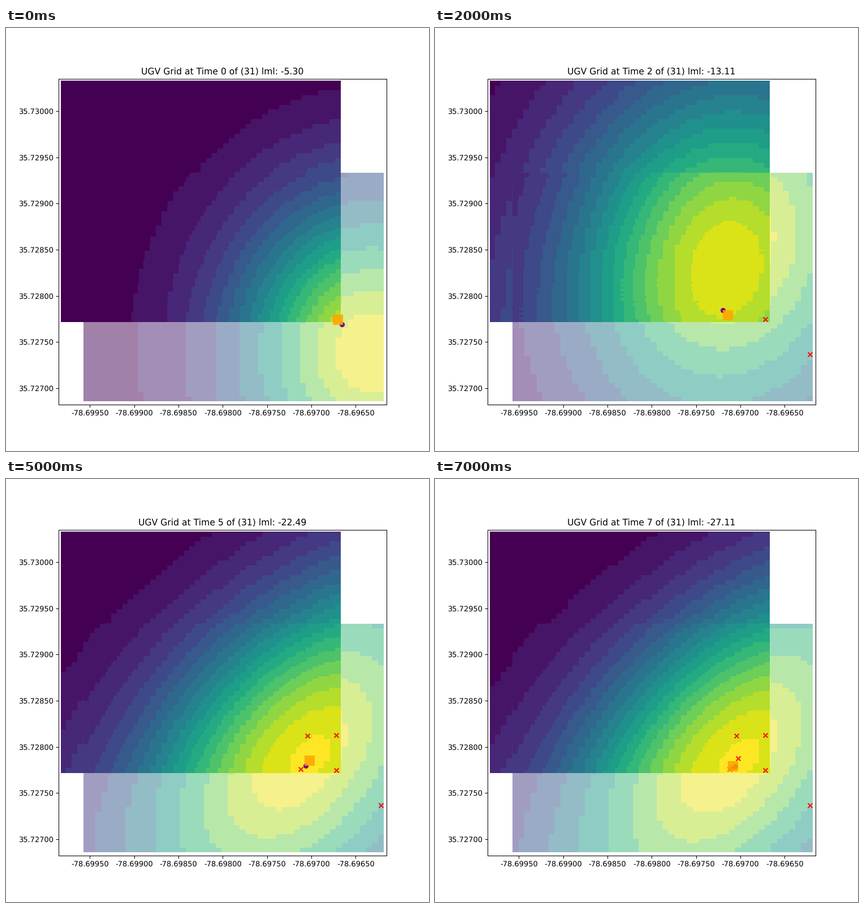
A matplotlib script for the animation above (8 s loop, 748x748 px).

```python
import numpy as np
import matplotlib.pyplot as plt
from matplotlib.animation import FuncAnimation
from matplotlib.patches import Rectangle

SIZE, DPI = 748, 93.5
STEPS = 8
CELLS = 50

# Stage coordinates in pixels: left, right, top, bottom.
UGV_BOX = (96.5, 592, 93, 520)
UAV_BOX = (137, 668.5, 256, 660.5)
LEFT, RIGHT, TOP, BOTTOM = 96, 669, 93, 661

# Bump at each phase: centre x, centre y, spread x, spread y
UGV_BUMPS = [(648, 575, 182, 203), (560, 488, 222, 218), (498, 500, 222, 300),
             (560, 455, 272, 250), (568, 493, 270, 245)]
UAV_BUMPS = [(648, 575, 164, 186), (490, 455, 178, 195), (527, 380, 188, 236),
             (518, 450, 185, 215), (520, 500, 218, 238)]

PATH_TIMES = [0, 1, 2, 3, 5, 7]
ROBOT_PATH = [(587, 515.5), (567, 498), (518, 507.5), (518, 507.5),
              (537.5, 498), (527.5, 507.5)]
GOAL_PATH = [(594.5, 524), (559, 490), (509.5, 499), (509.5, 499),
             (530, 506.5), (531, 508)]
SAMPLES = np.array([(663, 577), (584, 514.5), (521, 513), (584, 453),
                    (533.5, 454), (536, 494), (525.5, 510)])
LML = [-5.30, -10.04, -13.11, -15.93, -19.21, -22.49, -24.80, -27.11]

ramp = np.linspace(0, 0.96, 10)
PALE_LEVELS = ramp - 0.04 * np.sin(2 * np.pi * ramp)
SOLID_LEVELS = np.linspace(0, 1, 19)

px = np.arange(LEFT, RIGHT) + 0.5
py = np.arange(TOP, BOTTOM) + 0.5


def between(points, times, t):
    return [np.interp(t, times, column) for column in zip(*points)]


def snap(p, lo, hi):
    """Centre of the grid cell that holds each pixel."""
    step = (hi - lo) / CELLS
    return lo + (np.floor((p - lo) / step) + 0.5) * step


def inside(box):
    x0, x1, y0, y1 = box
    return ((px > x0) & (px < x1))[None, :] & ((py > y0) & (py < y1))[:, None]


def field(bumps, box, t):
    """Tilted Gaussian that changes fast at first, then settles."""
    phase = t if t <= 3 else 4 - np.exp(3 - t)
    cx, cy, sx, sy = between(bumps, range(len(bumps)), phase)
    rho = -0.5 * (phase / 4) ** 2
    u = ((snap(px, *box[:2]) - cx) / sx)[None, :]
    w = ((snap(py, *box[2:]) - cy) / sy)[:, None]
    q = (u * u + w * w - 2 * rho * u * w) / (1 - rho * rho)
    return np.exp(-q / 2)


def shade(values, levels):
    edges = (levels[1:] + levels[:-1]) / 2
    return plt.cm.viridis(levels[np.digitize(values, edges)])[..., :3]


IN_UGV, IN_UAV = inside(UGV_BOX), inside(UAV_BOX)


def heatmap(t):
    ugv = 1.02 * field(UGV_BUMPS, UGV_BOX, t) - 0.04
    uav = field(UAV_BUMPS, UAV_BOX, t)
    solid = np.where(IN_UAV, (ugv + uav) / 2, ugv)
    rgb = np.ones(ugv.shape + (3,))
    rgb[IN_UAV] = 0.5 + 0.5 * shade(uav, PALE_LEVELS)[IN_UAV]
    rgb[IN_UGV] = shade(solid, SOLID_LEVELS)[IN_UGV]
    return rgb


plt.rcParams["font.family"] = "DejaVu Sans"
plt.rcParams["text.hinting"] = "none"
fig, ax = plt.subplots(figsize=(SIZE / DPI, SIZE / DPI), dpi=DPI)
fig.subplots_adjust(left=93 / SIZE, right=0.9, bottom=0.11, top=0.88)

image = ax.imshow(heatmap(0), extent=(LEFT, RIGHT, BOTTOM, TOP),
                  aspect="auto", interpolation="nearest")
goal = ax.scatter([], [], s=36, color="purple", zorder=3)
marks = ax.scatter([], [], s=36, marker="x", color="red", zorder=4)
robot = ax.add_patch(Rectangle((0, 0), 18, 18, color="orange", alpha=0.87,
                               linewidth=0, zorder=5))

# One data unit is one pixel, with y pointing down.
ax.set_xlim(93, 0.9 * SIZE)
ax.set_ylim(0.89 * SIZE, 0.12 * SIZE)
k = np.arange(7)
ax.set_xticks(148.3 + 78.33 * k, [f"{-78.6995 + 0.0005 * i:.5f}" for i in k])
ax.set_yticks(147 + 81.67 * k, [f"{35.73 - 0.0005 * i:.5f}" for i in k])
title = ax.set_title("")


def update(t):
    image.set_data(heatmap(t))
    goal.set_offsets([between(GOAL_PATH, PATH_TIMES, t)])
    marks.set_offsets(SAMPLES[:t].reshape(-1, 2))
    x, y = between(ROBOT_PATH, PATH_TIMES, t)
    robot.set_xy((x - 9, y - 9))
    title.set_text(f"UGV Grid at Time {t} of (31) lml: {LML[t]:.2f}")
    return image, goal, marks, robot, title


anim = FuncAnimation(fig, update, frames=STEPS, interval=1000,
                     repeat=True, repeat_delay=0, blit=False)
plt.show()
```
